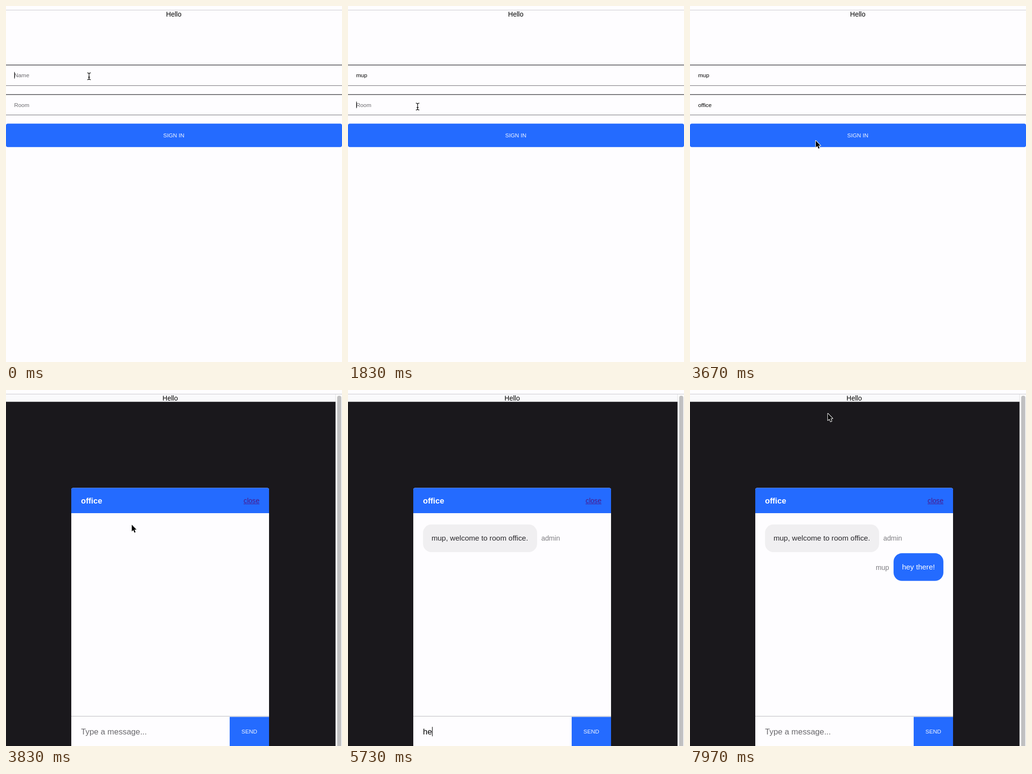
Animation, 700 px wide and 740 px high, one loop 8 s. Source, as an HTML page with a canvas:

```html
<!DOCTYPE html>
<html lang="en">
<head>
<meta charset="utf-8">
<title>Chat sign in</title>
<style>
html, body { margin: 0; width: 100%; height: 100%; overflow: hidden; background: #fefdff; }
canvas { display: block; width: 700px; height: 740px; }
</style>
</head>
<body>
<canvas id="stage"></canvas>
<script>
const W = 700, H = 740, LOOP = 8000, STEP = 100 / 3;
const FONT = '"Liberation Sans", Arial, Helvetica, sans-serif';
const PAPER = '#fefdff', BLUE = '#246bff', DARK = '#1a181c', INK = '#000';
const HINT = '#69686c', LABEL = '#7d7c80', LINK = '#4a1687';
const PANEL = { left: 136, top: 203.5, width: 412, pad: 20.3 };

const canvas = document.getElementById('stage');
const ctx = canvas.getContext('2d');
const ratio = window.devicePixelRatio || 1;
canvas.width = W * ratio;
canvas.height = H * ratio;
ctx.scale(ratio, ratio);

// Moments in ms
const CLICK_ROOM = 1330, PRESS_SIGN_IN = 3630, CHAT_OPEN = 3830, WELCOME = 3865;
const CLICK_INPUT = 5030, SENT = 7000, CARET_ON = 520;

// Each text is typed at its own steady pace
const user = { text: 'mup', start: 365, gap: 182 };
const room = { text: 'office', start: 1865, gap: 200 };
const message = { text: 'hey there!', start: 5495, gap: 130 };

const easeInOut = u => u * u * (3 - 2 * u);
const easeOut = u => 1 - (1 - u) ** 3;

// Pointer moves between its stops, then rests until hidden or moved on
const stops = {
  name: [173, 146], room: [145, 209], button: [262, 280],
  middle: [298, 520], input: [298, 689], away: [287, 34.5]
};
const moves = [
  { from: 'name', to: 'name', start: 0, end: 300, hide: user.start },
  { from: 'name', to: 'room', start: 1000, end: 1600, hide: room.start },
  { from: 'room', to: 'button', start: 2965, end: 3665, hide: 3870 },
  { from: 'button', to: 'middle', start: 3870, end: 4370, hide: 4500 },
  { from: 'middle', to: 'input', start: 4500, end: 5080, hide: message.start, ease: easeOut, bow: 13 },
  { from: 'input', to: 'away', start: 7130, end: 8050, hide: LOOP }
];

function rect(x, y, w, h, color, radius = 0) {
  ctx.fillStyle = color;
  ctx.beginPath();
  ctx.roundRect(x, y, w, h, radius);
  ctx.fill();
}

function text(str, x, y, size, color, align = 'left', weight = '') {
  ctx.font = `${weight} ${size}px ${FONT}`;
  ctx.textAlign = align;
  ctx.fillStyle = color;
  ctx.fillText(str, x, y);
}

function typed(entry, t) {
  return entry.text.slice(0, Math.max(0, Math.floor((t - entry.start) / entry.gap) + 1));
}

function input(value, hint, x, y, size, caret) {
  text(value || hint, x, y, size, value ? INK : HINT);
  if (!caret) return;
  const end = x + (value ? ctx.measureText(value).width : 0);
  rect(end + 0.2, y - size * 0.92, 1.1, size * 1.15, INK);
}

function field(top, bottom) {
  rect(0, top, W, 1.3, '#2b2a2e');
  rect(0, bottom, W, 1.1, '#716f75');
}

function drawForm(t) {
  text('Hello', W / 2 - 0.5, 21.6, 14, INK, 'center');
  field(122, 165);
  field(183.4, 226);
  input(typed(user, t), 'Name', 17, 148, 11.8, t < CLICK_ROOM);
  input(typed(room, t), 'Room', 17, 209.5, 11.8, t >= CLICK_ROOM && t < PRESS_SIGN_IN);
  rect(0, 244.5, W, 48.7, BLUE, 4);
  text('SIGN IN', W / 2 - 0.5, 272.8, 11.8, '#f4f7ff', 'center');
}

function bubble(str, x, y, w, fill, color) {
  rect(x, y, w, 57.5, fill, 17.5);
  text(str, x + 17.6, y + 33.7, 15.45, color);
}

function drawChat(t) {
  const { left, top, width, pad } = PANEL;
  const inner = left + pad, right = left + width, edge = right - pad;

  rect(0, 9, W, 15.5, '#fafafc');
  text('Hello', left + width / 2, 21.6, 14, INK, 'center');
  rect(686, 9, 14, H, '#fafafa');
  rect(686, 9, 1, H, '#e4e4e6');
  rect(690, 12, 8.5, H, '#c0c0c1', 4);
  rect(0, 24.5, 686.5, H, DARK);

  rect(left, top, width, H, PAPER, 4);
  rect(left, top, width, 52.5, BLUE, [4, 4, 0, 0]);
  text(room.text, inner, 236, 16.5, '#fff', 'left', 'bold');
  text('close', edge + 0.3, 235, 14.1, LINK, 'right');
  rect(edge - 32.7, 236.3, 33, 1, LINK);

  if (t >= WELCOME) {
    const welcome = `${user.text}, welcome to room ${room.text}.`;
    bubble(welcome, inner, 279.5, 237.6, '#f0eff1', '#29282c');
    text('admin', 402.7, 313.2, 14.3, LABEL);
  }
  if (t >= SENT) {
    bubble(message.text, edge - 103.6, 339.3, 103.8, BLUE, '#fff');
    text(user.text, edge - 113, 373.8, 14.3, LABEL, 'right');
  }

  rect(left, 677.6, width, 1.4, '#d0cfd2');
  const draft = t < SENT ? typed(message, t) : '';
  const caret = t >= CLICK_INPUT && t < SENT + CARET_ON;
  input(draft, 'Type a message...', inner, 715.8, 16.8, caret);
  rect(right - 82, 679.5, 82, 61, BLUE);
  text('SEND', right - 41, 713.8, 11.8, '#f4f7ff', 'center');
}

function drawBeam() {
  ctx.beginPath();
  for (const s of [-1, 1]) {
    ctx.moveTo(-3.6, 7.2 * s);
    ctx.quadraticCurveTo(-0.4, 7.2 * s, 0, 4.8 * s);
    ctx.quadraticCurveTo(0.4, 7.2 * s, 3.6, 7.2 * s);
  }
  ctx.moveTo(0, -5);
  ctx.lineTo(0, 5);
  ctx.moveTo(-2, 2);
  ctx.lineTo(2, 2);
  ctx.strokeStyle = '#111';
  ctx.lineWidth = 1.3;
  ctx.stroke();
}

function drawArrow() {
  const arrow = new Path2D('M0 0V14L3.2 11L5.6 16.6L7.9 15.6L5.5 10.2H9.9Z');
  ctx.lineJoin = 'round';
  ctx.strokeStyle = '#fff';
  ctx.lineWidth = 2;
  ctx.stroke(arrow);
  ctx.fillStyle = INK;
  ctx.fill(arrow);
}

function overInput(x, y, t) {
  if (t >= CHAT_OPEN) return y > 679;
  return (y > 122 && y < 166) || (y > 183 && y < 227);
}

function drawPointer(t) {
  const move = moves.find(m => t >= m.start && t < m.hide);
  if (!move) return;
  const { from, to, start, end, ease = easeInOut, bow = 0 } = move;
  const e = ease(Math.min(1, (t - start) / (end - start)));
  const [x0, y0] = stops[from], [x1, y1] = stops[to];
  const x = x0 + (x1 - x0) * e + bow * Math.sin(Math.PI * e);
  const y = y0 + (y1 - y0) * e;
  ctx.save();
  ctx.translate(x, y);
  if (overInput(x, y, t)) drawBeam();
  else drawArrow();
  ctx.restore();
}

function draw(now) {
  // Motion advances 30 times a second
  const t = Math.floor(((now % LOOP) + 4) / STEP) * STEP % LOOP + 2;
  rect(0, 0, W, H, PAPER);
  if (t < CHAT_OPEN) drawForm(t);
  else drawChat(t);
  rect(0, 8, W, 1, '#cbcacf');
  drawPointer(t);
}

let start;
function tick(now) {
  start ??= now;
  draw(now - start);
  requestAnimationFrame(tick);
}
draw(0);
requestAnimationFrame(tick);
</script>
</body>
</html>
```
